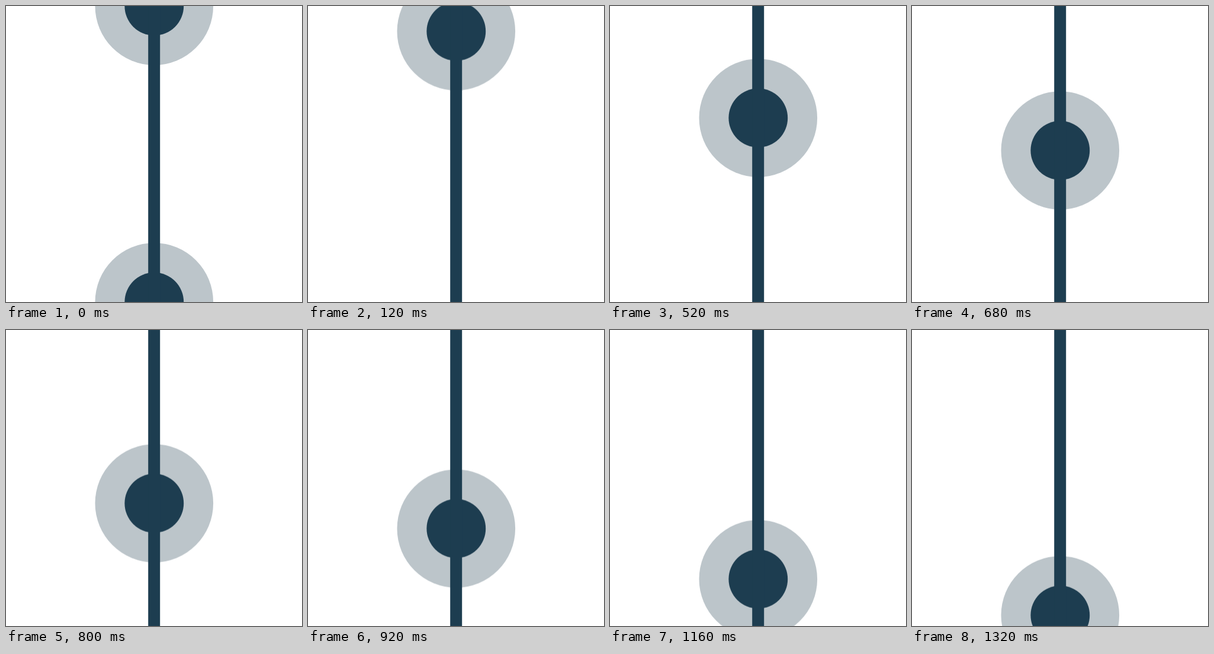
Animation, 500 px wide and 500 px high, one loop 1.36 s. Source, as an HTML page:

```html
<!DOCTYPE html>
<html lang="en">
<head>
<meta charset="utf-8">
<title>Sliding bead</title>
<style>
  html, body { margin: 0; width: 100%; height: 100%; overflow: hidden; background: #fff; }
  svg { display: block; width: 100vw; height: 100vh; }
  .halo { fill: #bcc5ca; }
  .core, .rod { fill: #1d3d50; }
</style>
</head>
<body>
<svg viewBox="0 0 500 500">
  <defs>
    <g id="shape">
      <circle class="halo" cx="250.3" r="99.8"/>
      <circle class="core" cx="250.3" r="49.9"/>
    </g>
  </defs>
  <g id="bead"><use href="#shape"/></g>
  <g id="exit"><use href="#shape" y="500"/></g>
  <rect class="rod" x="240.2" width="20" height="500"/>
</svg>
<script>
  const STEPS = 34, STEP_MS = 40, HEIGHT = 500, TICKS = 82;
  const loop = { duration: STEPS * STEP_MS, iterations: Infinity };
  const hold = 'step-end';

  // The bead moves one tick at 60 Hz, sampled every 40 ms.
  const yAt = i => Math.floor(i * 12 / 5) * HEIGHT / TICKS;

  const slide = Array.from({ length: STEPS + 1 }, (_, i) => ({
    offset: i / STEPS,
    transform: `translate(0px, ${yAt(Math.min(i, STEPS - 1))}px)`,
    easing: hold
  }));

  // The bottom bead shows only while the top one starts.
  const leave = [
    { offset: 0, opacity: 1, easing: hold },
    { offset: 1 / STEPS, opacity: 0, easing: hold },
    { offset: 1, opacity: 0 }
  ];

  const play = (id, frames) => {
    document.getElementById(id).animate(frames, loop).startTime = 0;
  };
  play('bead', slide);
  play('exit', leave);
</script>
</body>
</html>
```
